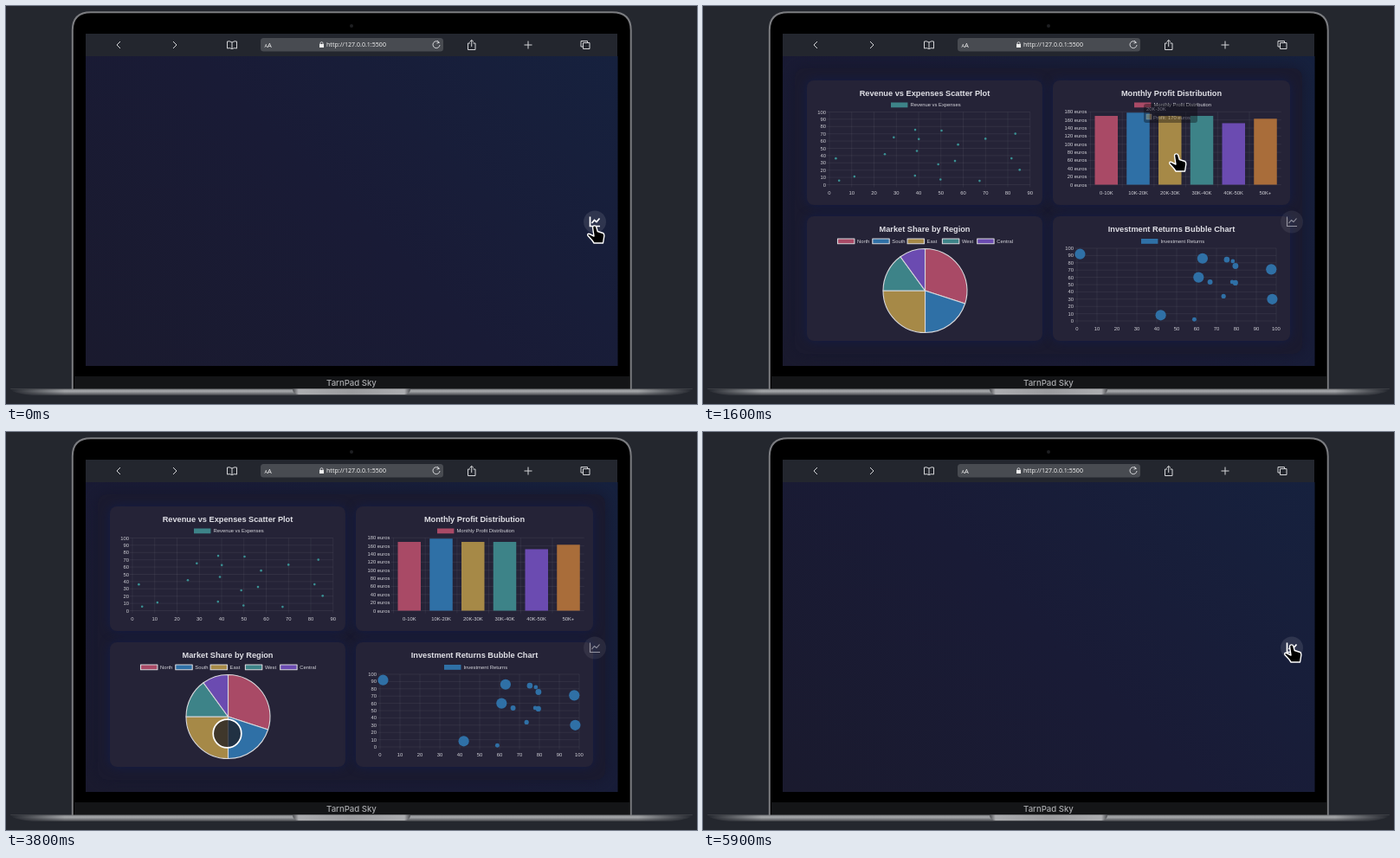
These frames come from a looping animation (798x460 px, 6000 ms). An HTML page:

```html
<!DOCTYPE html>
<html lang="en">
<head>
<meta charset="utf-8">
<title>Dashboard on a laptop</title>
<style>
html, body { margin: 0; width: 100%; height: 100%; overflow: hidden; background: #24272e }
svg { display: block; width: 798px; height: 460px }
text { font-family: "Liberation Sans", Arial, sans-serif }
.card { fill: #252337; filter: drop-shadow(0 0 6px #131c46) }
.title { font-size: 9.22px; font-weight: 700; fill: #e0e0e6; text-anchor: middle }
.small { font-size: 5.85px; fill: #d4d4da }
.grid { stroke: #fff; stroke-opacity: .1; stroke-width: .6 }
.icon { fill: none; stroke: #d4d5d8; stroke-width: 1 }
.url text { font-family: "Noto Sans", sans-serif; fill: #eee }
#panel { filter: blur(.42px) }
</style>
</head>
<body>
<svg viewBox="0 0 798 460">
  <defs>
    <linearGradient id="page" gradientUnits="userSpaceOnUse" x1="156" y1="480" x2="642" y2="-6">
      <stop stop-color="#1a1a2e"/><stop offset=".5" stop-color="#191b36"/><stop offset="1" stop-color="#16213e"/>
    </linearGradient>
    <linearGradient id="metal" x2="0" y2="1">
      <stop stop-color="#77797c"/><stop offset=".35" stop-color="#a8aaad"/><stop offset=".7" stop-color="#75777b"/><stop offset="1" stop-color="#3b3d42"/>
    </linearGradient>
    <linearGradient id="ends">
      <stop stop-color="#24272e"/><stop offset=".08" stop-color="#24272e" stop-opacity="0"/>
      <stop offset=".92" stop-color="#24272e" stop-opacity="0"/><stop offset="1" stop-color="#24272e"/>
    </linearGradient>
    <linearGradient id="notch">
      <stop stop-color="#4b4c50"/><stop offset=".05" stop-color="#adaeb1"/><stop offset=".5" stop-color="#9b9c9f"/><stop offset=".95" stop-color="#adaeb1"/><stop offset="1" stop-color="#4b4c50"/>
    </linearGradient>
    <clipPath id="view"><path d="M92 58H706.5V416H92Z"/></clipPath>
  </defs>
  <rect width="798" height="460" fill="#24272e"/>
  <path d="M76.800 444V28Q76.800 7.200 98 7.200H700Q721.700 7.200 721.700 28V444Z" fill="#000" stroke="#7b7c80" stroke-width="2"/>
  <path d="M79 428H720V444H79Z" fill="#141517"/>
  <circle cx="399" cy="23" r="2" fill="#1d1e22"/>
  <text x="399" y="439" text-anchor="middle" style="font:500 9.6px Inter,sans-serif" fill="#a9aaad">TarnPad Sky</text>
  <path d="M5 442.500H793Q792 447 768 450H30Q6 447 5 442.500Z" fill="url(#metal)"/>
  <path d="M5 442.500H793V450H5Z" fill="url(#ends)"/>
  <path d="M331 442.500H467Q467 449 460 449H338Q331 449 331 442.500Z" fill="url(#notch)"/>

  <path d="M92 32H706V58H92Z" fill="#23262e"/>
  <rect x="294" y="37" width="211" height="15.500" rx="3.500" fill="#484b51"/>
  <g class="icon">
    <path d="M132 41L128 45L132 49M193 41L197 45L193 49M603 40.500V49.500M598.500 45H607.500"/>
    <path d="M261 42Q258 40 255.500 41V49Q258 48 261 49.500Q264 48 266.500 49V41Q264 40 261 42V49.500"/>
    <path d="M500 42A4 4 0 1 0 501 45M498 40L500.500 42.300L497.500 43"/>
    <path d="M536 43H533.500V50.500H542V43H539.500M537.700 47V39.500M535.500 41.500L537.700 39.300L540 41.500"/>
    <path d="M666 47H664V40.500H671.500V42.500M666.500 42.500H674V49.500H666.500Z"/>
    <path d="M363 44V42.500Q364.500 40.500 366 42.500V44"/>
  </g>
  <path d="M362 44H367V48H362Z" fill="#eee"/>
  <g class="url">
    <text x="298.500" y="47.500" font-size="5.500">A</text>
    <text x="302" y="47.500" font-size="7.500">A</text>
    <text x="370" y="47.300" font-size="7.070">http://127.0.0.1:5500</text>
  </g>
  <path d="M92 58H706.500V416H92Z" fill="url(#page)"/>
  <g clip-path="url(#view)">
    <g id="panel"></g>
    <g id="button">
      <circle cx="680" cy="249.500" r="13" fill="#fff" fill-opacity=".1"/>
      <path id="chartIcon" d="M674.500 243.500V254.500H686M676.500 251L679.500 247.500L682 249.500L685.500 245.500" fill="none"/>
    </g>
  </g>
  <path id="hand" d="M-2.500 2C-2.500 -.5 1 -1 1.800 1.500L3.200 6.500L9.500 8.500Q11 9.200 10.800 12L9.500 20H-1L-3 17L-8 11.500Q-9 8.500 -6 9.500L-1 12Z" fill="#000" stroke="#fff" stroke-width="1.400" stroke-linejoin="round"/>
  <circle id="dot" r="16.300" fill="#1c1c22" fill-opacity=".75" stroke="#fff" stroke-width="1.700"/>
</svg>
<script>
const $ = id => document.getElementById(id);
const [pink, blue, gold, teal, violet, orange] = ['#a94a66', '#2f70a6', '#a68947', '#3d8388', '#6b4bb1', '#a96d3a'];
const steps = (n, size, unit = '') => Array.from({ length: n }, (_, i) => i * size + unit);

let seed = 4242;
const random = (lo, hi) => lo + (hi - lo) * (seed = seed * 16807 % 2147483647) / 2147483647;

const text = (x, y, s, anchor = 'start') => `<text class="small" x="${x}" y="${y}" text-anchor="${anchor}">${s}</text>`;
const box = (x, y, w, h, fill, extra = '') => `<rect x="${x}" y="${y}" width="${w}" height="${h}" fill="${fill}" ${extra}/>`;
const disc = (x, y, r, fill) => `<circle cx="${x}" cy="${y}" r="${r}" fill="${fill}"/>`;
const legend = (x, y, s, fill, extra) => box(x, y, 19.4, 5.8, fill, extra) + text(x + 22.5, y + 4.9, s);
const card = (x, y, w, title) =>
  `<rect class="card" x="${x}" y="${y}" width="${w}" height="144" rx="8"/><text class="title" x="${x + w / 2}" y="${y + 18.3}">${title}</text>`;

// Grid and evenly spaced tick labels, starting from the lower left corner
function axes(left, base, dx, xs, dy, ys, centred = 0) {
  const right = left + dx * (xs.length - 1 + centred), top = base - dy * (ys.length - 1);
  let s = '';
  ys.forEach((label, i) => {
    const y = base - i * dy;
    s += `<path class="grid" d="M${left - 3} ${y}H${right}"/>` + text(left - 4, y + 2, label, 'end');
  });
  xs.forEach((label, i) => {
    const x = left + i * dx;
    s += `<path class="grid" d="M${x} ${top}V${base + 3}"/>` + text(x + centred * dx / 2, base + 11, label, 'middle');
  });
  return s;
}

function scatter() {
  const dots = steps(19, 1).map(() => disc(random(150, 366), random(125, 203), 1.3, '#3a9194'));
  return card(120, 86, 272, 'Revenue vs Expenses Scatter Plot') + legend(217, 111.5, 'Revenue vs Expenses', teal) +
    axes(146, 206.5, 25.75, steps(10, 10), 8.4, steps(11, 10)) + dots.join('');
}

function bars() {
  const profits = [170, 178, 170, 170, 152, 163], fills = [pink, blue, gold, teal, violet, orange];
  const names = ['0-10K', '10K-20K', '20K-30K', '30K-40K', '40K-50K', '50K+'], unit = 9.35 / 20;
  return card(404, 86, 274, 'Monthly Profit Distribution') + legend(498, 111.5, 'Monthly Profit Distribution', pink) +
    axes(447.5, 206.5, 36.7, names, 20 * unit, steps(10, 20, ' euros'), 1) +
    profits.map((v, i) => box(452.5 + i * 36.75, 206.5 - v * unit, 26.5, v * unit, fills[i])).join('');
}

function pie() {
  const parts = [['North', .3, pink], ['South', .2, blue], ['East', .25, gold], ['West', .15, teal], ['Central', .1, violet]];
  const rim = a => `${256.5 + 48.5 * Math.sin(a * 2 * Math.PI)} ${329 - 48.5 * Math.cos(a * 2 * Math.PI)}`;
  const edge = 'stroke="#d8d8dc" stroke-width="1.1" stroke-linejoin="round"';
  let s = card(120, 243, 272, 'Market Share by Region'), from = 0;
  parts.forEach(([name, share, fill], i) => {
    s += legend(155.5 + 40.3 * i, 269, name, fill, edge) +
      `<path d="M256.5 329L${rim(from)}A48.5 48.5 0 0 1 ${rim(from += share)}Z" fill="${fill}" ${edge}/>`;
  });
  return s;
}

function bubbles() {
  const large = [[1.5, 92], [63, 86], [61, 60], [42, 8], [97.5, 71], [98, 30]];
  const small = steps(8, 1).map(() => [random(55, 80), random(2, 98), random(2, 3.5)]);
  return card(404, 243, 274, 'Investment Returns Bubble Chart') + legend(506, 269, 'Investment Returns', blue) +
    axes(432, 364, 23, steps(11, 10), 8.4, steps(11, 10)) +
    [...large, ...small].map(([x, y, r = 6.1]) => disc(432 + 2.3 * x, 364 - .84 * y, r, blue)).join('');
}

$('panel').innerHTML =
  box(106, 72, 586, 330, '#1a1a2f', 'rx="10" style="filter:drop-shadow(0 0 9px #15162c)"') +
  scatter() + bars() + pie() + bubbles() +
  `<g id="tip" opacity=".45">${box(0, 0, 62, 22, '#0a0a10', 'rx="3" fill-opacity=".85"')}${text(3, 8, '20K-30K')}
   ${box(3, 12, 6, 6, gold, 'stroke="#ddd" stroke-width=".5"')}${text(11, 17.5, 'Profit: 170 euros')}</g>`;

// CSS "ease" timing: cubic-bezier(.25, .1, .25, 1), solved by bisection
function ease(x) {
  if (x <= 0) return 0;
  if (x >= 1) return 1;
  const curve = (u, a, b) => 3 * a * (1 - u) ** 2 * u + 3 * b * (1 - u) * u * u + u ** 3;
  let lo = 0, hi = 1;
  for (let i = 0; i < 20; i++) {
    const u = (lo + hi) / 2;
    if (curve(u, .25, .25) < x) lo = u; else hi = u;
  }
  return curve(lo, .1, 1);
}

// Pointer stops: time, x, y
const stops = [[800, 680, 254], [1500, 508, 180], [1600, 547, 171], [2000, 612, 160], [2400, 495, 130], [3800, 255.5, 348.5],
  [4400, 305, 363], [4700, 711, 228], [4800, 711, 228], [4900, 678, 233], [5400, 680, 246]];

function pointer(t) {
  const n = stops.findIndex(s => s[0] > t);
  if (n < 1) return stops.at(n).slice(1);
  const [t0, x0, y0] = stops[n - 1], [t1, x1, y1] = stops[n], p = (t - t0) / (t1 - t0);
  return [x0 + (x1 - x0) * p, y0 + (y1 - y0) * p];
}

const overBars = (x, y) => x > 440 && x < 664 && y > 122 && y < 206;
const overButton = (x, y) => Math.hypot(x - 680, y - 250) < 22;
const place = (id, x, y, visible) => {
  $(id).setAttribute('transform', `translate(${x} ${y})`);
  $(id).setAttribute('visibility', visible ? 'inherit' : 'hidden');
};

function draw(now) {
  const t = Math.floor(now % 6000 / 100) * 100;   // ten pictures a second
  const shown = t < 5500 ? ease((t - 84) / 800) : 1 - ease((t - 5500) / 400);
  place('panel', -615 * (1 - shown), 0, shown > 0);

  // The tooltip trails the pointer within its own narrow range
  const [lagX, lagY] = pointer(t - 100);
  const tipX = Math.min(546, Math.max(509, lagX));
  place('tip', tipX, 113 + (tipX - 509) * .3, overBars(lagX, lagY));

  const lit = t < 100 || t >= 5100;
  $('button').setAttribute('opacity', lit ? 1 : .7);
  $('chartIcon').setAttribute('stroke', lit ? '#fff' : '#c8c8d0');
  $('chartIcon').setAttribute('stroke-width', lit ? 1.7 : 1.1);

  const [x, y] = pointer(t), clickable = overBars(x, y) || overButton(x, y);
  place('hand', x, y, clickable);
  place('dot', x, y, !clickable);
}

const start = performance.now();
function frame() {
  draw(performance.now() - start);
  requestAnimationFrame(frame);
}
frame();
</script>
</body>
</html>
```
